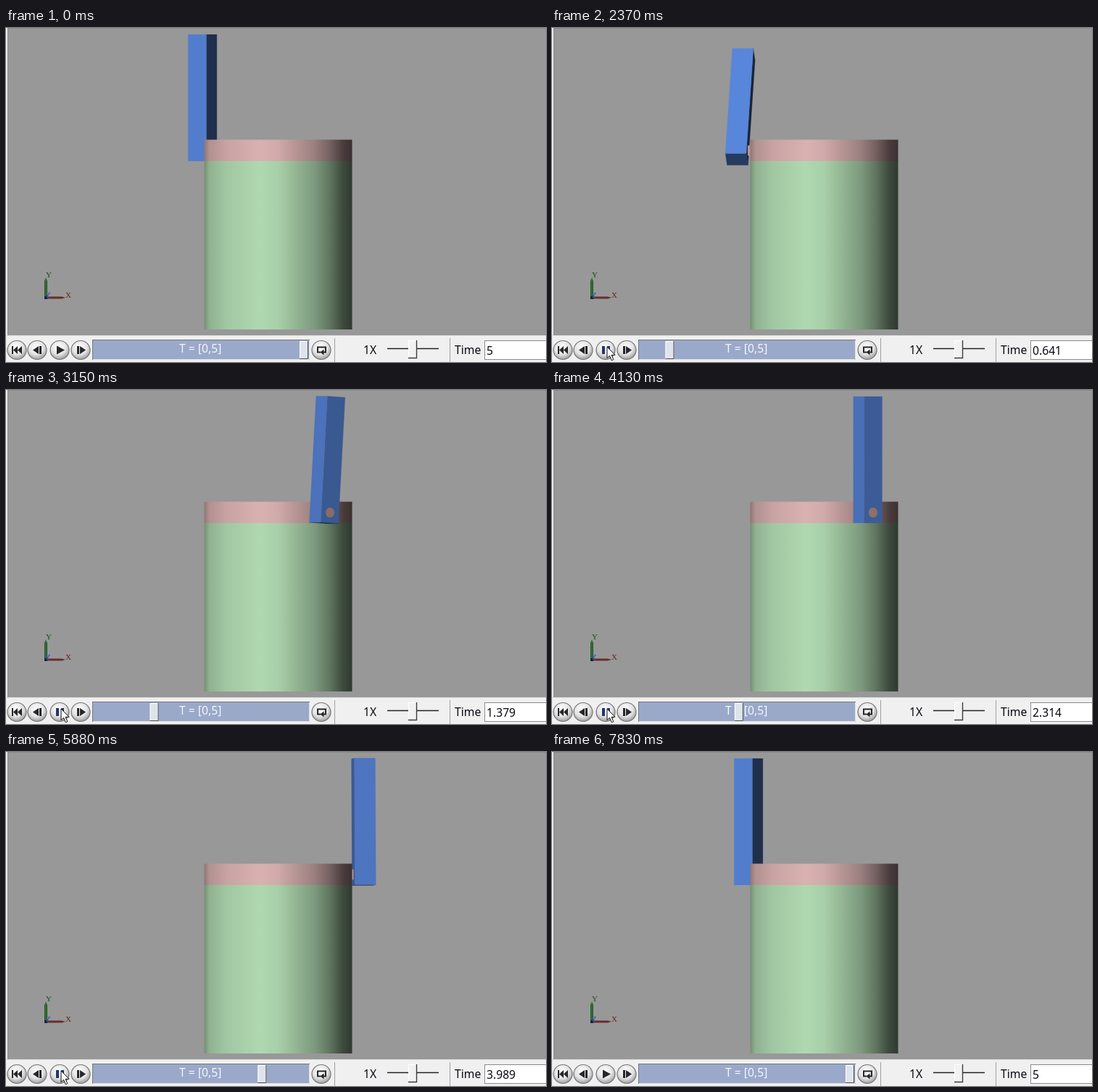
Write an HTML page that moves like this. It is 745 px wide and 462 px high and loops after 7.9 s.

```html
<!DOCTYPE html>
<html lang="en">
<head>
<meta charset="utf-8">
<title>Rotary pendulum</title>
<style>
html, body { margin: 0; width: 100%; height: 100%; overflow: hidden; background: #989898; }
svg { display: block; width: 745px; height: 462px; }
text { font-family: "Noto Sans", "Open Sans", sans-serif; font-size: 15.7px; fill: #0a0a14; }
.axis text { font-family: "Liberation Serif", serif; font-size: 11px; }
</style>
</head>
<body>
<svg viewBox="0 0 745 462">
  <defs>
    <linearGradient id="green"></linearGradient>
    <linearGradient id="pink"></linearGradient>
    <radialGradient id="metal" cx=".45" cy=".35" r=".65">
      <stop offset="0" stop-color="#fff"/>
      <stop offset=".6" stop-color="#e4e4e4"/>
      <stop offset="1" stop-color="#9c9c9c"/>
    </radialGradient>
    <linearGradient id="stem"><stop offset="0" stop-color="#1f4a20"/><stop offset=".5" stop-color="#3a7a3c"/><stop offset="1" stop-color="#1f4a20"/></linearGradient>
  </defs>

  <rect width="745" height="462" fill="#989898"/>
  <path d="M0 .5H745" stroke="#8a8a8a"/>
  <g id="back"></g>
  <rect x="273.5" y="183.5" width="204" height="233.5" fill="url(#green)"/>
  <rect x="273.5" y="154.5" width="204" height="29.5" fill="url(#pink)"/>
  <g id="front"></g>

  <g class="axis">
    <path d="M53 374V350L55 345L57 350V374Z" fill="url(#stem)"/>
    <path d="M55 371.5H77L82 373L77 374.5H55Z" fill="#6a2c2c"/>
    <rect x="53" y="371" width="4" height="4" fill="#15204c"/>
    <text x="55" y="345" style="fill:#174f18">Y</text>
    <text x="82" y="373" style="fill:#6a2020">X</text>
    <text x="55" y="373" style="fill:#2a50b8">Z</text>
  </g>

  <rect width="2" height="462" fill="#ececec"/>
  <path d="M2.5 0V425" stroke="#858585"/>
  <rect y="425" width="745" height="37" fill="#f0f0f0"/>
  <path d="M0 425.5H745" stroke="#dcdcdc"/>
  <path d="M453.5 429V462M612.5 429V462" stroke="#a0a0a0"/>

  <g id="buttons" fill="url(#metal)" stroke="#777" stroke-width="1.2"></g>
  <g fill="#26262c">
    <path d="M8 440h2v11h-2zM16 440v11l-6-5.500zM22 440v11l-6-5.500z"/>
    <path d="M45 440v11l-8-5.500zM46 440h3v11h-3z"/>
    <path d="M98 440h3v11h-3zM102 440v11l8-5.500z"/>
    <path id="play" d="M70 439.500v12l11-6z"/>
    <path id="pause" d="M69 440h4v11h-4zM76 440h4v11h-4z" fill="#22356e"/>
    <path d="M434 448.500h-4v-7h11v7h-3" fill="none" stroke="#26262c" stroke-width="2"/>
    <path d="M438.500 444.500v8l-5-4z"/>
  </g>

  <rect x="119.500" y="431.500" width="299" height="27" fill="#9aa9c9" stroke="#767676"/>
  <path d="M120 458.500H418.500V432" fill="none" stroke="#e2e2e2"/>
  <text x="239" y="449" style="fill:#f4f6fb">T = [0,5]</text>
  <g id="thumb">
    <rect x="-6" y="433" width="12" height="25" fill="#dfe3ec"/>
    <path d="M-5.500 457V433.500H5" fill="none" stroke="#fff"/>
    <path d="M5.500 433V457.500H-6" fill="none" stroke="#4c4c4c"/>
  </g>

  <text x="493" y="451">1X</text>
  <path d="M526 443.500H597" stroke="#222" stroke-width="1.500"/>
  <rect x="555" y="432" width="12" height="25" fill="#f2f2f2"/>
  <path d="M555.500 456V432.500H566" fill="none" stroke="#fff"/>
  <path d="M566.500 432V456.500H555" fill="none" stroke="#3c3c3c" stroke-width="1.400"/>
  <text x="619" y="451">Time</text>
  <rect x="660.500" y="432.500" width="90" height="26" fill="#fff" stroke="#8a8a8a"/>
  <text id="clock" x="663" y="452">5</text>

  <circle id="glow" cx="75" cy="445" r="14" fill="#f3ec2c" fill-opacity=".72"/>
  <path id="cursor" d="M0 0V15.500L3.600 12.300L6.200 18.800L8.800 17.700L6.100 11.300H11Z" fill="#fff" stroke="#111" stroke-width="1"/>
</svg>
<script>
const $ = id => document.getElementById(id);
const LOOP = 7900, STEP = 70.2, ANCHOR = 2370;
const CX = 375, PIVOT_Y = 169.5, ARM = 120, HALF = 14.5, REACH = 160.5, PIN = 7;
const BLUE = [86, 131, 214], PINK = [217, 177, 177], GREEN = [175, 216, 176];

// brightness by the sideways part of the surface normal
const light = [[-1, .66], [-.93, .82], [-.7, .92], [-.25, 1], [0, .96], [.2, .86],
  [.5, .71], [.7, .54], [.88, .34], [1, .27]];

// simulated seconds by display step
const clockKeys = [[-9.6, 0], [0, .641], [11, 1.379], [39, 3.249], [59, 4.595], [65.05, 5]];

// seconds, arm angle, pendulum tilt
const poses = [[0, 90, 180], [.2, 106, 150], [.4, 150, 92], [.641, 185.7, 34],
  [.85, 162, 2], [1.1, 104, -8], [1.379, 57.6, -3.6], [1.65, 51, 0], [2.2, 59, 0],
  [3.249, 59.1, -.4], [3.7, 32, -3], [4.1, -25, -1.5], [4.595, -97.1, 0], [5, -150, 0]];

// milliseconds, cursor tip
const route = [[190, 487, 462], [260, 470, 440], [430, 300, 433], [620, 120, 435], [800, 50, 439],
  [1000, 50, 439], [1410, 77, 441], [2000, 76, 441], [7060, 76, 441], [7430, 104, 464]];

function find(keys, x) {
  let i = 0;
  while (i < keys.length - 2 && x >= keys[i + 1][0]) i++;
  const u = (x - keys[i][0]) / (keys[i + 1][0] - keys[i][0]);
  return [i, Math.min(1, Math.max(0, u))];
}

function lerp(keys, x, col = 1) {
  const [i, u] = find(keys, x);
  return keys[i][col] + (keys[i + 1][col] - keys[i][col]) * u;
}

function spline(keys, x, col) {
  const [i, u] = find(keys, x);
  const slope = k => {
    const p = keys[Math.max(0, k - 1)], q = keys[Math.min(keys.length - 1, k + 1)];
    return (q[col] - p[col]) / (q[0] - p[0]);
  };
  const h = keys[i + 1][0] - keys[i][0], v = 1 - u;
  return keys[i][col] * v * v * (1 + 2 * u) + keys[i + 1][col] * u * u * (3 - 2 * u)
    + h * u * v * (slope(i) * v - slope(i + 1) * u);
}

const rgb = (base, k) => `rgb(${base.map(c => Math.min(255, Math.round(c * k)))})`;
const add = (...vs) => [0, 1, 2].map(i => vs.reduce((s, v) => s + v[i], 0));
const mul = (v, k) => v.map(c => c * k);

function shade(n) {
  const k = lerp(light, n[0]);
  return Math.min(1.02, k * (n[1] < 0 ? 1 + .65 * n[1] : 1 + .2 * n[1]));
}

const project = p => `${(CX + p[0]).toFixed(2)},${(PIVOT_Y - p[1]).toFixed(2)}`;

function boxFaces(centre, axes, halves) {
  let out = "";
  for (let i = 0; i < 3; i++) for (const s of [-1, 1]) {
    const n = mul(axes[i], s);
    if (n[2] < .004) continue;
    const j = (i + 1) % 3, k = (i + 2) % 3;
    const pts = [[-1, -1], [1, -1], [1, 1], [-1, 1]].map(([p, q]) => project(add(centre,
      mul(n, halves[i]), mul(axes[j], p * halves[j]), mul(axes[k], q * halves[k]))));
    const fill = rgb(BLUE, shade(n));
    out += `<polygon points="${pts.join(" ")}" fill="${fill}" stroke="${fill}" stroke-width=".3"/>`;
  }
  return out;
}

function drawPendulum(sec) {
  const a = spline(poses, sec, 1) * Math.PI / 180, tilt = spline(poses, sec, 2) * Math.PI / 180;
  const r = [Math.cos(a), 0, Math.sin(a)], t = [-Math.sin(a), 0, Math.cos(a)];
  const up = add(mul(t, Math.sin(tilt)), [0, Math.cos(tilt), 0]);
  const side = add(mul(t, Math.cos(tilt)), [0, -Math.sin(tilt), 0]);
  const pivot = mul(r, ARM), long = (REACH + HALF) / 2;
  const box = boxFaces(add(pivot, mul(up, long - HALF)), [r, up, side], [HALF, long, HALF]);
  const [x1, x2] = [100, ARM - HALF].map(d => CX + r[0] * d);
  const rod = `<path d="M${x1} ${PIVOT_Y}H${x2}" stroke="${rgb(PINK, .85)}" stroke-width="${2 * PIN}"/>`;
  const near = r[2] > 0;
  const [px, py] = project(mul(r, ARM + HALF)).split(",");
  const cap = `<ellipse cx="${px}" cy="${py}" rx="${PIN * r[2]}" ry="${PIN}" fill="${rgb([200, 160, 152], shade(r))}"/>`;
  $("front").innerHTML = near ? rod + box + cap : "";
  $("back").innerHTML = near ? "" : box + rod;
}

const show = (id, on) => $(id).setAttribute("visibility", on ? "visible" : "hidden");
const moveTo = (id, x, y) => $(id).setAttribute("transform", `translate(${x.toFixed(1)} ${y.toFixed(1)})`);

function render(ms) {
  const step = Math.floor((ms - ANCHOR + 4) / STEP);
  const sec = step < -10 ? 5 : lerp(clockKeys, step);
  const running = step >= -10 && sec < 5;
  drawPendulum(sec);
  moveTo("thumb", 126 + 57 * sec, 0);
  $("clock").textContent = +sec.toFixed(3);
  show("play", !running);
  show("pause", running);
  show("glow", ms >= 1610 && ms < 1820);
  show("cursor", ms >= 190 && ms < 7430);
  moveTo("cursor", lerp(route, ms, 1), lerp(route, ms, 2));
}

function fillGradient(id, base) {
  $(id).innerHTML = light.map(([x, k]) =>
    `<stop offset="${(x + 1) / 2}" stop-color="${rgb(base, k)}"/>`).join("");
}

fillGradient("green", GREEN);
fillGradient("pink", PINK);
$("buttons").innerHTML = [15, 43, 74, 103, 435].map(x => `<circle cx="${x}" cy="445.5" r="13"/>`).join("");

function tick() {
  render(performance.now() % LOOP);
  requestAnimationFrame(tick);
}
tick();
</script>
</body>
</html>
```
